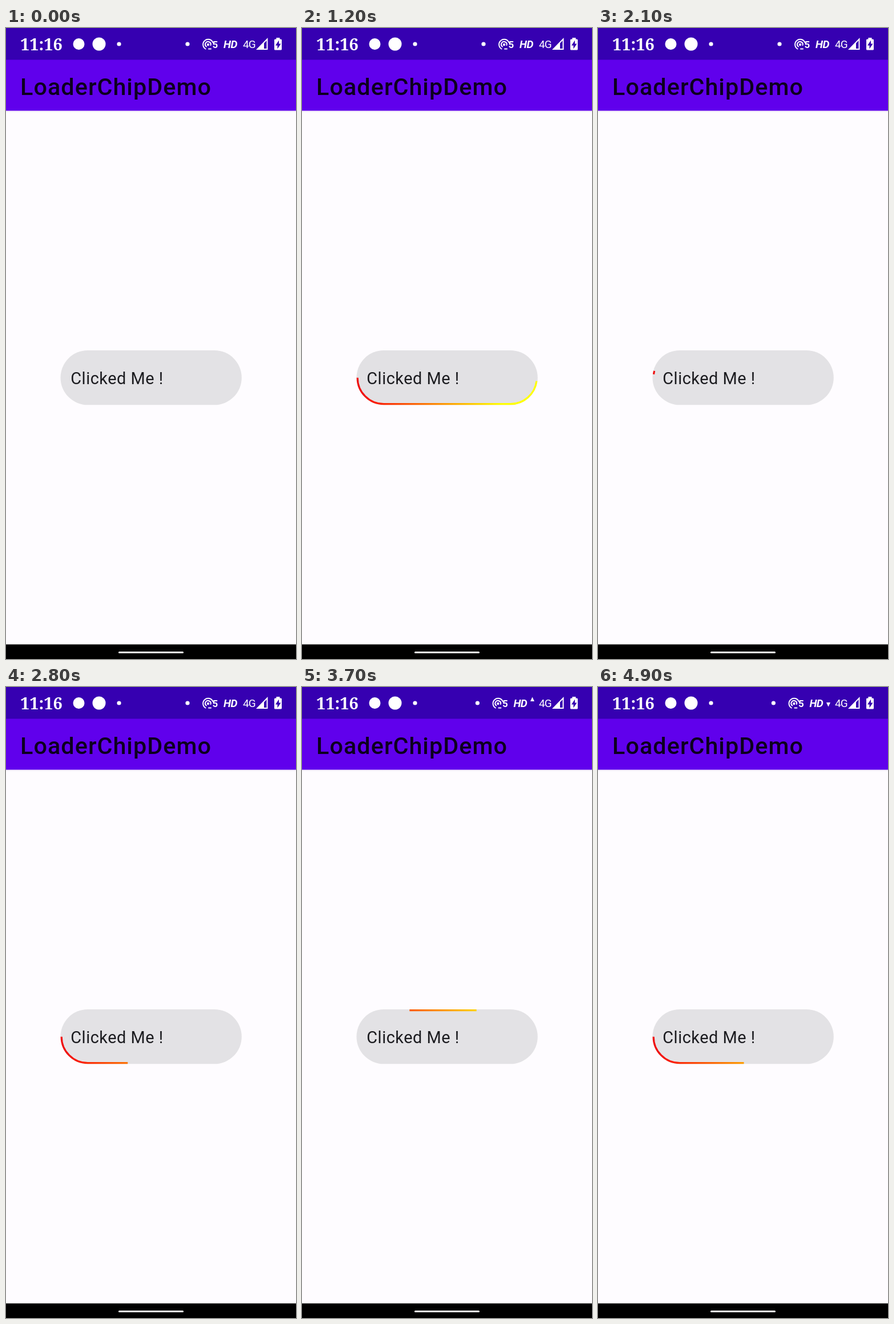
An HTML page that plays this animation: 508x1102 px, repeating every 5 s.

```html
<!DOCTYPE html>
<html lang="en">
<head>
<meta charset="utf-8">
<title>Loader chip</title>
<style>
  html, body { margin: 0; width: 100%; height: 100%; overflow: hidden; background: #fefcff; }
  svg { display: block; width: 508px; height: 1102px; }
  text { font-family: Roboto, "Open Sans", sans-serif; }
  .clock { font: bold 29px "Noto Serif", serif; }
  .title { font-size: 41.3px; font-weight: 500; letter-spacing: 1.03px; fill: #0d001f; }
  .label { font-size: 28.9px; letter-spacing: .52px; fill: #1b1b1f; }
  .five { font-size: 17px; font-weight: 700; }
  .hd { font-size: 19px; font-weight: 700; font-style: italic; letter-spacing: -.6px; }
  .net { font-size: 19px; letter-spacing: -1px; }
  .line { fill: none; stroke: #fff; stroke-width: 2; stroke-linecap: round; }
</style>
</head>
<body>
<svg viewBox="0 0 508 1102">
  <defs>
    <linearGradient id="heat" gradientUnits="userSpaceOnUse" x1="105" y1="0" x2="350" y2="0">
      <stop stop-color="#f01010"/>
      <stop offset=".1" stop-color="#fa1e08"/>
      <stop offset="1" stop-color="#ffff00"/>
    </linearGradient>
    <linearGradient id="shade" x2="0" y2="1">
      <stop stop-color="#efe8f6"/>
      <stop offset="1" stop-color="#fefcff"/>
    </linearGradient>
  </defs>

  <rect width="508" height="1102" fill="#fefcff"/>
  <rect y="144" width="508" height="4" fill="url(#shade)"/>
  <rect y="55" width="508" height="89.500" fill="#6000ec"/>
  <rect width="508" height="55.500" fill="#3600b1"/>
  <text class="title" x="25" y="117">LoaderChipDemo</text>

  <g fill="#fff">
    <text class="clock" x="25" y="39">11:16</text>
    <circle cx="127.500" cy="28" r="10"/>
    <circle cx="163" cy="28" r="11.500"/>
    <circle cx="198" cy="28" r="3.600"/>

    <g id="shifting">
      <circle cx="318" cy="28" r="3.600"/>
      <circle cx="354" cy="29" r="2.200"/>
      <path class="line" d="M349.500 36.500A9 9 0 1 1 362.500 25.500M351 32.500A4.800 4.800 0 1 1 358.500 30M355 36.500h4"/>
      <text class="five" x="361.500" y="35">5</text>
      <text class="hd" x="381" y="34.500">HD</text>
    </g>

    <path id="up" d="M400 25h7l-3.500-7.500z"/>
    <path id="down" d="M400 27h7l-3.500 7.500z"/>
    <text class="net" x="415" y="35">4G</text>
    <path d="M438 38L458.500 17V38z"/>
    <path d="M452 26.500L456.500 22V36H452z" fill="#3600b1"/>
    <path d="M473.500 17h6v2.500h2q1.500 0 1.500 1.500v16q0 1.500-1.500 1.500h-10q-1.500 0-1.500-1.500v-16q0-1.500 1.500-1.500h2z"/>
    <path d="M478 21.500l-6 9h3.500v6l6-9h-3.500z" fill="#3600b1"/>
  </g>

  <rect id="chip" x="95.500" y="563" width="317.300" height="95.300" rx="47.600"/>
  <path id="loader" pathLength="1" fill="none" stroke="url(#heat)" stroke-width="3.200"
    d="M97.200 610.700A46 46 0 0 0 143.200 656.700H365.300A46 46 0 0 0 365.300 564.700H143.200A46 46 0 0 0 97.200 610.700"/>
  <text class="label" x="113.300" y="622">Clicked Me !</text>

  <rect y="1076.500" width="508" height="26"/>
  <rect x="197" y="1089" width="114" height="3" rx="1.500" fill="#fff"/>
</svg>
<script>
  const LOOP = 5000, STEP = 100, START = 205, TURN = 2011;
  const $ = id => document.getElementById(id);
  const ramp = (t, from, to) => Math.min(1, Math.max(0, (t - from) / (to - from)));
  const show = (id, on) => $(id).setAttribute("visibility", on ? "visible" : "hidden");

  function draw(t) {
    // The tail waits for half a turn, then catches up with the head.
    const phase = Math.max(0, t - START) / TURN % 1;
    const head = (1 - Math.cos(Math.PI * phase)) / 2;
    const tail = Math.max(0, 2 * head - 1);
    $("loader").setAttribute("stroke-dasharray", `0 ${tail} ${head - tail} 2`);
    show("loader", head > 0);

    const press = ramp(t, 100, 400) - ramp(t, 700, 1300);
    const tone = 227 - 7 * press;
    $("chip").setAttribute("fill", `rgb(${tone},${tone - 1 + press},${tone + 2 - 2 * press})`);

    const busy = t >= 3300;
    $("shifting").setAttribute("transform", `translate(${busy ? -10.6 : 0})`);
    show("up", busy && t < 4400);
    show("down", t >= 4400);
  }

  const origin = performance.now();
  function tick() {
    const t = (performance.now() - origin) % LOOP;
    draw(Math.floor(t / STEP) * STEP);
    requestAnimationFrame(tick);
  }
  tick();
</script>
</body>
</html>
```
